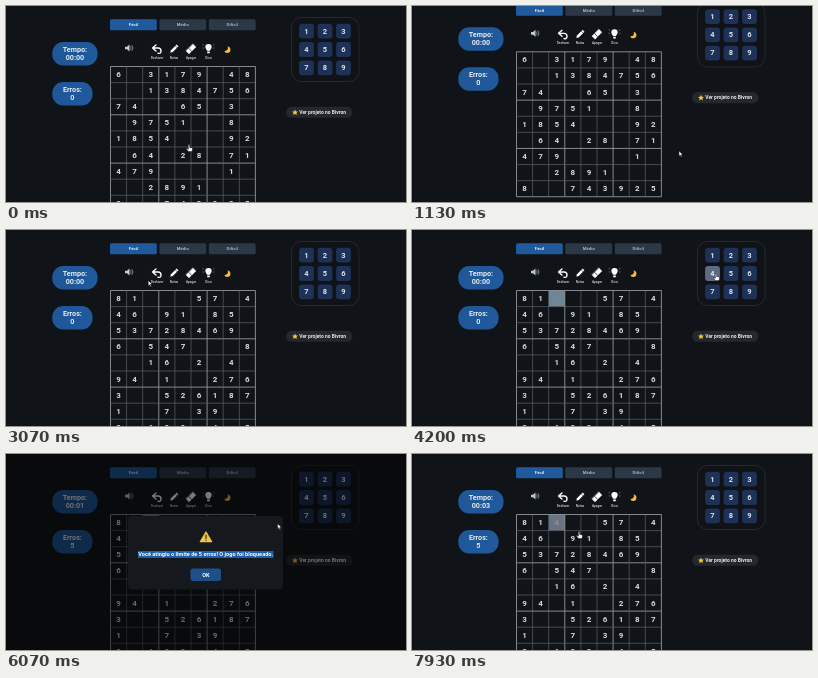
Animation of 400 by 196 pixels, one loop 8000 ms. Source, as an HTML page with a canvas:

```html
<!DOCTYPE html>
<html lang="pt">
<head>
<meta charset="utf-8">
<title>Sudoku</title>
<style>
html, body { margin: 0; width: 100%; height: 100%; overflow: hidden; background: #101418; }
canvas { display: block; width: 400px; height: 196px; }
</style>
</head>
<body>
<canvas id="stage"></canvas>
<script>
const LOOP = 8000, CELL = 16.1, GRID_X = 104.5, GRID_Y = 60.5;
const canvas = document.getElementById('stage');
const ctx = canvas.getContext('2d');
const dpr = window.devicePixelRatio || 1;
canvas.width = 400 * dpr;
canvas.height = 196 * dpr;

const FIRST_BOARD = [
  '6.3179.48', '..1384756', '74..65.3.', '.9751..8.', '1854...92',
  '.64.28.71', '479....1.', '..2891...', '8..743925'];
const SECOND_BOARD = [
  '81...57.4', '46.91.85.', '53728469.', '6.547...8', '..16.2.4.',
  '94.1..276', '3..526187', '1..7.39..', '2.689.4.5'];

// Time, x, y of the mouse pointer
const POINTER = [
  [0, 183, 139], [180, 183, 139], [620, 267, 145], [1150, 267, 145], [1750, 190, 60],
  [2150, 136, 21.5], [2750, 136, 21.5], [3300, 146, 68], [3600, 146, 68], [4050, 304, 44],
  [5800, 304, 44], [6500, 207, 121], [7050, 207, 121], [7700, 167, 78], [8000, 167, 78]];
const ERROR_TIMES = [4480, 4680, 4880, 5080, 5280];
const TICKS = [5100, 6100, 7100];

const clamp = v => Math.min(1, Math.max(0, v));
const ramp = (t, start, end) => clamp((t - start) / (end - start));
const ease = p => p * p * (3 - 2 * p);
const countPast = (times, t) => times.filter(at => t >= at).length;

function pointerAt(t) {
  const i = POINTER.findIndex((k, n) => n && t <= k[0]);
  const [t0, x0, y0] = POINTER[i - 1], [t1, x1, y1] = POINTER[i];
  const p = ease(ramp(t, t0, t1));
  return [x0 + (x1 - x0) * p, y0 + (y1 - y0) * p];
}

function text(str, x, y, size, color = '#e6e9ec', weight = 700, align = 'center') {
  ctx.font = `${weight} ${size}px Roboto, sans-serif`;
  ctx.textAlign = align;
  ctx.fillStyle = color;
  ctx.fillText(str, x, y + size * 0.31);
}

function box(x, y, w, h, r, fill, stroke) {
  ctx.beginPath();
  ctx.roundRect(x, y, w, h, r);
  ctx.fillStyle = fill;
  ctx.fill();
  if (stroke) {
    ctx.strokeStyle = stroke;
    ctx.lineWidth = 0.8;
    ctx.stroke();
  }
}

function shape(d, x, y, fill, stroke, width = 1, angle = 0) {
  const path = new Path2D(d);
  ctx.save();
  ctx.translate(x, y);
  ctx.rotate(angle);
  ctx.lineJoin = ctx.lineCap = 'round';
  if (fill) { ctx.fillStyle = fill; ctx.fill(path); }
  if (stroke) { ctx.strokeStyle = stroke; ctx.lineWidth = width; ctx.stroke(path); }
  ctx.restore();
}

function pill(x, y, w, label, value) {
  const shade = ctx.createLinearGradient(x, y, x + w, y + 23.5);
  shade.addColorStop(0, '#1f5797');
  shade.addColorStop(1, '#205a9d');
  box(x, y, w, 23.5, 11, shade);
  text(label, x + w / 2, y + 7.8, 7.2);
  text(value, x + w / 2, y + 15.7, 7.2);
}

function drawToolbar() {
  ['Fácil', 'Médio', 'Difícil'].forEach((name, i) => {
    const x = 104 + i * 49.4;
    box(x, 13.3, 46.8, 11, 1.5, i ? '#2b3947' : '#205a9c');
    text(name, x + 23.4, 18.9, 4.3, i ? '#a8b3be' : '#e6ecf2');
  });
  shape('M-4-1.3h2l2.5-2.2v7L-2 1.3h-2z', 123, 42, '#c3cad2');
  shape('M1.7-1.3q1.2 1.3 0 2.6M3-2.6q2.4 2.6 0 5.2', 123, 42, null, '#8fa2b5', 0.8);
  shape('M-1-4L-4.5-1-1 2M-4-1H1Q4-1 4 2T1 4.2', 151, 43, null, '#fff', 1.4);
  shape('M-1.3-5h2.6v8L0 5.3-1.3 3z', 168, 43, '#fff', null, 1, 0.78);
  shape('M-1.3-3.2h2.6', 168, 43, null, '#101418', 0.6, 0.78);
  shape('M-2-4.8h4v9.6h-4z', 185, 43, '#fff', '#fff', 0.6, 0.78);
  shape('M-2 1.2h4', 185, 43, null, '#101418', 0.7, 0.78);
  shape('M-1.4 2.2Q-3.2 0-3.2-1.4A3.2 3.2 0 0 1 3.2-1.4Q3.2 0 1.4 2.2zM-1.3 3h2.6v1.7h-2.6z', 202.5, 42.5, '#fff');
  shape('M-4.8-3l-.8-.5M4.8-3l.8-.5M-4.8 0h-.8M4.8 0h.8', 202.5, 42, null, '#aab', 0.5);
  shape('M.6-2.9A3.2 3.2 0 1 1-2.8 1.3 2.9 2.9 0 0 0 .6-2.9', 221, 43.5, '#f4bd3c');
  [['Desfazer', 151], ['Notas', 168], ['Apagar', 185], ['Dica', 202.5]]
    .forEach(([name, x]) => text(name, x, 51.7, 3.2, '#d5d8db', 500));
}

function drawBoard(t, errors) {
  const rows = t < 2500 ? FIRST_BOARD : SECOND_BOARD;
  if (t >= 3500) {
    ctx.fillStyle = errors ? '#687485' : '#708595';
    ctx.fillRect(GRID_X + 2 * CELL, GRID_Y, CELL, CELL);
    if (errors) text('4', GRID_X + 2.5 * CELL, GRID_Y + CELL / 2, 8, '#c58a4c', 500);
  }
  rows.forEach((row, r) => [...row].forEach((digit, c) => {
    if (digit !== '.')
      text(digit, GRID_X + (c + 0.5) * CELL, GRID_Y + (r + 0.5) * CELL, 8, '#d8dbde');
  }));
  for (let i = 0; i <= 9; i++) {
    const d = i * CELL, major = i % 3 === 0;
    ctx.strokeStyle = major ? '#92969a' : '#5c6166';
    ctx.lineWidth = major ? 0.9 : 0.7;
    ctx.beginPath();
    ctx.moveTo(GRID_X + d, GRID_Y);
    ctx.lineTo(GRID_X + d, GRID_Y + 9 * CELL);
    ctx.moveTo(GRID_X, GRID_Y + d);
    ctx.lineTo(GRID_X + 9 * CELL, GRID_Y + d);
    ctx.stroke();
  }
}

function drawSide(t) {
  box(285.5, 11.5, 67.5, 64, 10, '#0f1317', '#2a2f36');
  const hover = ramp(t, 4050, 4400) * (1 - ramp(t, 5750, 5950));
  for (let n = 0; n < 9; n++) {
    const x = 300.5 + n % 3 * 18.5, y = 25.2 + Math.floor(n / 3) * 18.3;
    box(x - 7.4, y - 7.4, 14.8, 14.8, 3, '#1e3156');
    if (n === 3 && hover) {
      ctx.globalAlpha = hover;
      box(x - 7.4, y - 7.4, 14.8, 14.8, 3, '#b2b6bc');
      ctx.globalAlpha = 1;
    }
    text(n + 1, x, y, 7.5, '#dde3ea');
  }
  box(280, 100.8, 66.5, 11, 5.5, '#24272b');
  shape('M0-3L.9-1 3-.8 1.4.6 1.9 2.7 0 1.6-1.9 2.7-1.4.6-3-.8-.9-1z', 289, 106.4, '#f7c53b');
  text('Ver projeto no Bivron', 293.3, 106.4, 4.95, '#e6e9ec', 700, 'left');
}

function drawModal(t) {
  const closing = 1 - ramp(t, 6830, 6980);
  const shade = ramp(t, 5490, 5850) * closing;
  const panel = ramp(t, 5550, 5930);
  if (!shade) return;
  ctx.fillStyle = `rgba(0,0,0,${0.52 * shade})`;
  ctx.fillRect(0, 0, 400, 196);
  ctx.save();
  ctx.globalAlpha = panel * closing;
  ctx.translate(0, 7 * (1 - panel));
  box(122, 62, 155, 73.5, 4, '#15191e');
  shape('M0-5L5.7 4.7H-5.7z', 200, 83, '#f5c542', '#f5c542', 1.2);
  shape('M0-2V1.3M0 3.2v.1', 200, 83, null, '#22252a', 1.2);
  if (t > 5650) {
    ctx.fillStyle = '#1c5dac';
    ctx.fillRect(132, 97, 135.5, 7);
  }
  text('Você atingiu o limite de 5 erros! O jogo foi bloqueado.', 199.7, 100.5, 5.6, '#fff');
  box(184.5, 114.5, 30.5, 12.5, 2.5, '#1e4f88');
  text('OK', 199.8, 120.9, 5.5, '#fff');
  ctx.restore();
}

function drawPointer(t) {
  const [x, y] = pointerAt(t);
  const inside = (l, top, r, b) => x >= l && x <= r && y >= top && y <= b;
  const modalOpen = t > 5800 && t < 6900;
  const hand = modalOpen ? inside(184, 114, 215, 127)
    : inside(104, 60, 250, 196) || inside(104, 13, 250, 25) || inside(292, 17, 346, 70);
  if (hand)
    shape('M-.7 0Q0-.9.7 0V2.4L3 2.9Q3.7 3.2 3.5 4L3 6.6H-.6L-2.6 3.9Q-2.4 3-.7 4z', x, y, '#fff', '#111', 0.5);
  else
    shape('M0 0V5.2L1.2 4.1 2.1 6 3 5.6 2.1 3.8H3.7z', x, y, '#fff', '#111', 0.5);
}

function draw(t) {
  const scroll = 15 * (ease(ramp(t, 250, 550)) - ease(ramp(t, 1100, 1450)));
  const errors = countPast(ERROR_TIMES, t);
  ctx.setTransform(dpr, 0, 0, dpr, 0, 0);
  ctx.fillStyle = '#101418';
  ctx.fillRect(0, 0, 400, 196);
  ctx.save();
  ctx.translate(0, -scroll);
  drawToolbar();
  pill(46.3, 36, 45.2, 'Tempo:', '00:0' + countPast(TICKS, t));
  pill(46.3, 76, 40.2, 'Erros:', errors);
  drawBoard(t, errors);
  drawSide(t);
  ctx.restore();
  drawModal(t);
  drawPointer(t);
}

const start = performance.now();
function frame() {
  draw((performance.now() - start) % LOOP);
  requestAnimationFrame(frame);
}
frame();
</script>
</body>
</html>
```
